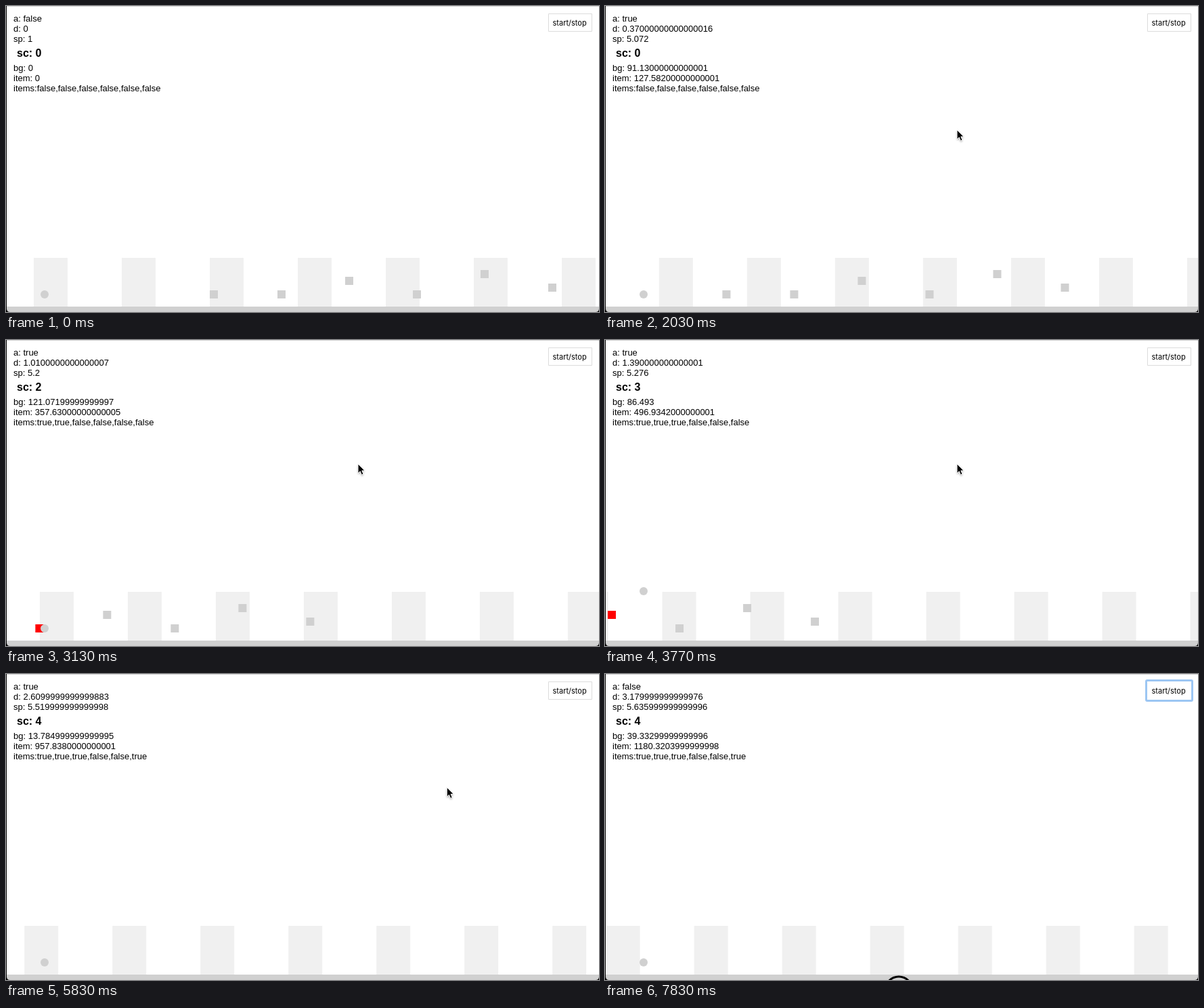
Recreate the animation shown at these times as an HTML page with a canvas. Size 876x452 px, loop 7910 ms.

```html
<!DOCTYPE html>
<html lang="en">
<head>
<meta charset="utf-8">
<title>Runner</title>
<style>
html, body { margin: 0; width: 100%; height: 100%; overflow: hidden; background: #fff; }
canvas { display: block; width: 876px; height: 452px; }
</style>
</head>
<body>
<canvas id="stage" width="876" height="452"></canvas>
<script>
const ctx = document.getElementById('stage').getContext('2d');
const W = 876, H = 452, LOOP = 7910;
const GREY = '#d0d0d0', PALE = '#f0f0f0';
const SANS = '"Liberation Sans", Arial, sans-serif';
const SIZE = 12, GROUND = 420, BALL_X = 51;
const LAST_TICK = 318, TICKS_PER_STEP = 1.969, FIRST_STEP = 42.2;
const JUMP = { from: 125, ticks: 40, height: 60.4 };
const PRESS_START = 1290, BLUR = 1800, PRESS_STOP = 6560;

const itemTops = [0, 0, 20, 0, 30, 10].map(up => GROUND - up);

// Pointer moves: each one slows down into its end point
const home = { x: 451, y: 454 };
const button = { x: 850, y: 21 };
const idle = { x: 520, y: 183 };
const moves = [
  { from: 40, to: 600, end: { x: 522, y: 311 }, bend: 0 },
  { from: 770, to: 1230, end: button, bend: 0 },
  { from: 1430, to: 1735, end: idle, bend: -17 },
  { from: 5690, to: 6330, end: button, bend: 51 },
  { from: 6980, to: 7500, end: { x: 433, y: 466 }, bend: 0 }
];

function pointerAt(t) {
  let { x, y } = home;
  for (const { from, to, end, bend } of moves) {
    if (t < from) break;
    const u = Math.min(1, (t - from) / (to - from));
    const e = 1 - (1 - u) ** 2;
    x += (end.x - x) * e;
    y += (end.y - y) * e + bend * 4 * e * (1 - e);
  }
  return { x, y };
}

function jumpHeight(tick) {
  const u = (tick - JUMP.from) / JUMP.ticks;
  return Math.max(0, JUMP.height * 4 * u * (1 - u));
}

const itemX = (i, scroll) => 301 + 100 * i - scroll;

// Run the game once and keep the state after every tick
function simulate() {
  let d = 0, sp = 1, bg = 0, item = 0;
  const hits = itemTops.map(() => false);
  const states = [];
  for (let n = 0; n <= LAST_TICK; n++) {
    const ballTop = GROUND - jumpHeight(n);
    itemTops.forEach((top, i) => {
      const near = Math.abs(itemX(i, item) - BALL_X) < SIZE;
      if (near && Math.abs(top - ballTop) < SIZE) hits[i] = true;
    });
    states.push({ d, sp, bg, item, ballTop, hits: [...hits] });
    bg = bg > 130 ? 0 : bg + sp * 0.5;
    item += sp * 0.7;
    sp = 5 + d * 0.2;
    d += 0.01;
  }
  states[LAST_TICK].sp = sp;
  return states;
}
const states = simulate();

function rect(x, y, w, h, color) {
  ctx.fillStyle = color;
  ctx.fillRect(x, y, w, h);
}

function disc(x, y, r, color) {
  ctx.fillStyle = color;
  ctx.beginPath();
  ctx.arc(x, y, r, 0, Math.PI * 2);
  ctx.fill();
}

function text(str, x, y, font) {
  ctx.fillStyle = '#000';
  ctx.font = font;
  ctx.fillText(str, x, y);
}

function drawStats(s, active) {
  const list = (lines, y) => lines.forEach((line, i) => text(line, 11, y + 15 * i, '13px ' + SANS));
  list(['a: ' + active, 'd: ' + s.d, 'sp: ' + s.sp], 23);
  text('sc: ' + s.hits.filter(Boolean).length, 16, 75, 'bold 16px ' + SANS);
  list(['bg: ' + s.bg, 'item: ' + s.item, 'items:' + s.hits], 96);
}

function drawButton(focus) {
  if (focus) {
    ctx.strokeStyle = '#9cc6f3';
    ctx.lineWidth = 3;
    ctx.beginPath();
    ctx.roundRect(799.5, 9.5, 68, 30, 1.5);
  } else {
    ctx.strokeStyle = '#dcdcdc';
    ctx.lineWidth = 1;
    ctx.beginPath();
    ctx.rect(801.5, 11.5, 64, 26);
  }
  ctx.stroke();
  text('start/stop', 807.5, 29, '11px Inter, sans-serif');
}

function drawScene(s) {
  for (let x = 41 - s.bg; x < W; x += 130) rect(x, 372, 50, 72, PALE);
  itemTops.forEach((top, i) => {
    rect(itemX(i, s.item), top, SIZE, SIZE, s.hits[i] ? '#f00' : GREY);
  });
  disc(BALL_X + SIZE / 2, s.ballTop + SIZE / 2, SIZE / 2, GREY);
  rect(0, 444, W, 8, GREY);
}

function drawWindowEdge() {
  rect(0, 0, W, 1, '#d2d2d2');
  rect(0, 0, 1, H, '#000');
  ctx.fillStyle = '#000';
  for (const [x, side] of [[1, 1], [W, -1]]) {
    ctx.beginPath();
    ctx.moveTo(x, H - 5);
    ctx.quadraticCurveTo(x, H, x + 5 * side, H);
    ctx.lineTo(x, H);
    ctx.fill();
  }
}

const arrow = new Path2D('M0 0V14L3.2 11L5.4 16.2L8 15.1L5.8 10H10Z');

function drawPointer(t) {
  const { x, y } = pointerAt(t);
  const pressed = [PRESS_START, PRESS_STOP].some(p => t >= p && t < p + 420) || t > 7820;
  ctx.save();
  ctx.translate(x, y);
  if (pressed) {
    ctx.strokeStyle = '#000';
    ctx.lineWidth = 3;
    ctx.beginPath();
    ctx.arc(1, 1, 20, 0, Math.PI * 2);
    ctx.stroke();
  }
  ctx.shadowColor = 'rgba(0,0,0,.4)';
  ctx.shadowBlur = 3;
  ctx.shadowOffsetY = 1.5;
  ctx.fillStyle = '#fff';
  ctx.fill(arrow);
  ctx.shadowColor = 'transparent';
  ctx.fillStyle = '#000';
  ctx.fill(arrow);
  ctx.strokeStyle = '#fff';
  ctx.lineWidth = 1;
  ctx.stroke(arrow);
  ctx.restore();
}

// The picture advances thirty times a second
function stepAt(t) {
  const rest = t % 100;
  return Math.floor(t / 100) * 3 + (rest >= 70 ? 2 : rest >= 30 ? 1 : 0);
}

function draw(t) {
  const step = stepAt(t), time = step * 100 / 3;
  const tick = Math.floor((step - FIRST_STEP) * TICKS_PER_STEP);
  const n = Math.min(LAST_TICK, Math.max(0, tick));
  const s = states[n];
  rect(0, 0, W, H, '#fff');
  drawScene(s);
  drawStats(s, n > 0 && n < LAST_TICK);
  drawButton(time >= PRESS_START && time < BLUR || time >= PRESS_STOP);
  drawPointer(time);
  drawWindowEdge();
}

const start = performance.now();
function loop() {
  draw((performance.now() - start) % LOOP);
  requestAnimationFrame(loop);
}
loop();
</script>
</body>
</html>
```
